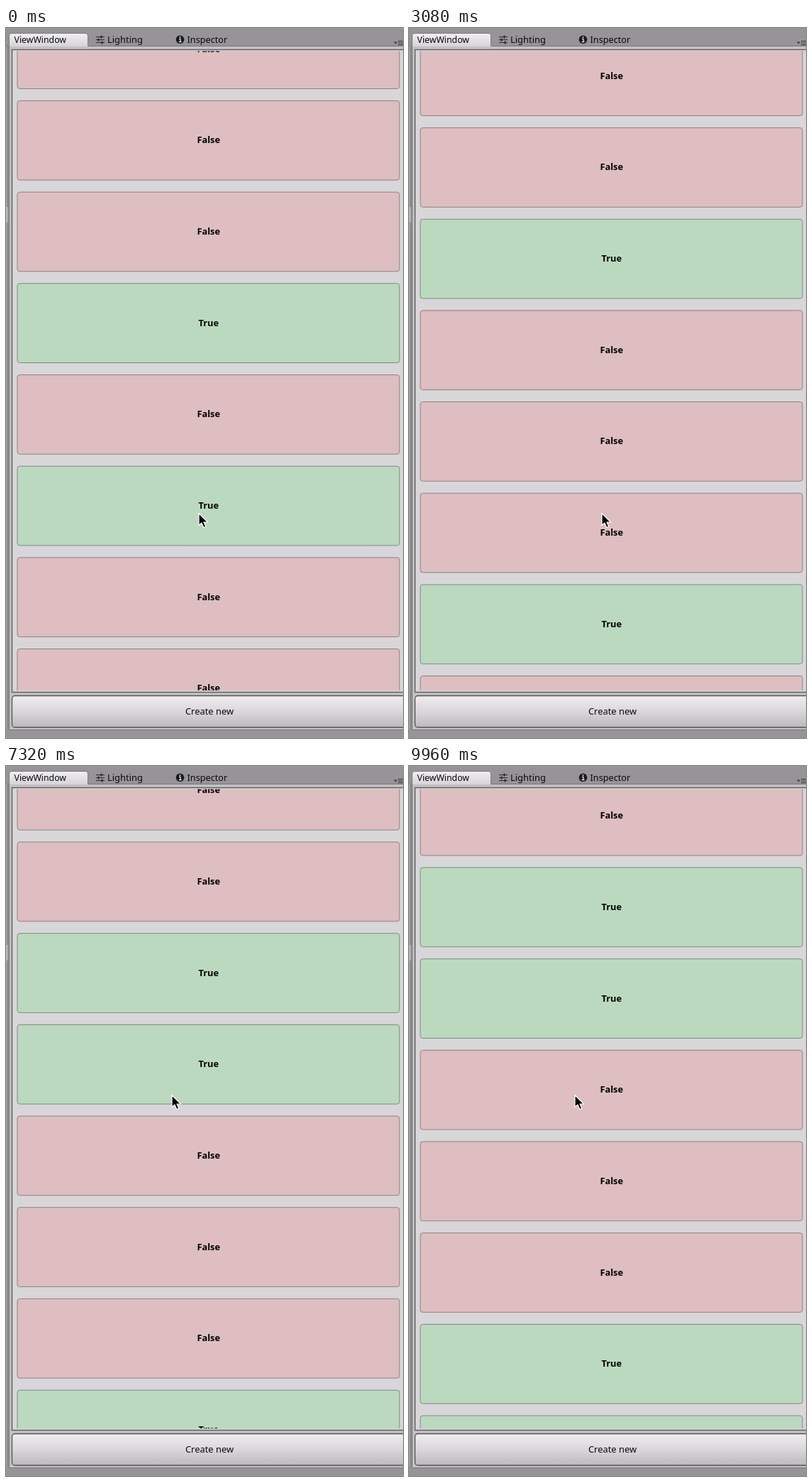
An HTML page that plays this animation: 560x1000 px, repeating every 10 s.

```html
<!DOCTYPE html>
<html lang="en">
<head>
<meta charset="utf-8">
<title>Endless list</title>
<style>
  html, body { margin: 0; width: 100%; height: 100%; overflow: hidden; background: #969496; }
  svg { display: block; width: 560px; height: 1000px; }
  text { font: 12.9px "Noto Sans", "Open Sans", sans-serif; fill: #0a0a0a; }
  .card text { font-size: 12.8px; font-weight: 700; text-anchor: middle; fill: #000; }
  .card rect { fill: #debec0; stroke: #8d8183; }
  .card.on rect { fill: #bbd9bf; stroke: #7d8b81; }
</style>
</head>
<body>
<svg viewBox="0 0 560 1000">
  <defs>
    <linearGradient id="tab" x2="0" y2="1">
      <stop offset="0" stop-color="#f1eff2"/><stop offset="1" stop-color="#d6d4d7"/>
    </linearGradient>
    <linearGradient id="up" x2="0" y2="1">
      <stop offset="0" stop-color="#f0edf1"/><stop offset=".5" stop-color="#dad7db"/><stop offset="1" stop-color="#bbb9bc"/>
    </linearGradient>
    <linearGradient id="down" x2="0" y2="1">
      <stop offset="0" stop-color="#8d8b8e"/><stop offset=".2" stop-color="#a3a1a4"/><stop offset="1" stop-color="#a3a1a4"/>
    </linearGradient>
    <clipPath id="view"><rect x="9" y="32.5" width="551" height="900.5"/></clipPath>
  </defs>

  <rect width="560" height="1000" fill="#969496"/>
  <rect y="25" width="3" height="963" fill="#a19fa2"/>
  <rect y="252" width="2" height="22" fill="#bab8bb"/>
  <path d="M0 25H2.500V252M2.500 274V988" fill="none" stroke="#7b797c"/>
  <rect x="4" y="25" width="556" height="963.500" fill="#c3c1c4"/>
  <path d="M560 25.500H4.500V988.500H560" fill="none" stroke="#777578"/>
  <path d="M4.500 26V11Q4.500 7.500 8 7.500H112Q115.500 7.500 115.500 11V26Z" fill="url(#tab)"/>
  <path d="M4.500 26V11Q4.500 7.500 8 7.500H112Q115.500 7.500 115.500 11V25.500" fill="none" stroke="#7d7b7e"/>
  <text x="11.500" y="21" style="font-size:12.3px">ViewWindow</text>

  <g stroke="#2c2a2d" stroke-width="1.200">
    <path d="M127 12.500H139M127 16.500H139M127 20.500H139"/>
    <path d="M134.500 10.500V14.500M130.500 14.500V18.500M135.500 18.500V22.500" stroke-width="2"/>
  </g>
  <text x="143" y="21">Lighting</text>
  <circle cx="245.500" cy="16.300" r="5.800" fill="#19181a"/>
  <path d="M244 15.300H246V19.500M243.800 19.500H247.500" fill="none" stroke="#e4e2e5" stroke-width="1.300"/>
  <circle cx="245.500" cy="13" r="1" fill="#e4e2e5"/>
  <text x="255.500" y="21" style="font-size:12.7px">Inspector</text>
  <path d="M547 19.500H552L549.500 22.500Z" fill="#39373a"/>
  <path d="M553 18.500H560M553 21H560M553 23.500H560" stroke="#39373a"/>

  <rect x="8.500" y="30.500" width="560" height="905" fill="#d8d6d9" stroke="#5f5d60" stroke-width="1.400"/>
  <g id="list" clip-path="url(#view)"></g>

  <rect id="button" x="8.500" y="940.500" width="570" height="44.500" rx="4" stroke="#555356" stroke-width="1.300"/>
  <text x="287" y="966.800" text-anchor="middle">Create new</text>

  <g id="cursor">
    <circle id="ring" r="24.500" fill="none" stroke="#111" stroke-width="1.500"/>
    <path d="M0 -.5V16.500L3.900 13L6.800 19.500L9.800 18.200L7 12H12.500Z" fill="#000" stroke="#fff" stroke-width="1.200" stroke-linejoin="round"/>
  </g>
</svg>
<script>
const NS = "http://www.w3.org/2000/svg";
const LOOP = 10000, STEP = 40, PITCH = 128.67;
const BASE = "FFTTTTT" + "FFTFFFTFTFF";
const $ = id => document.getElementById(id);

// Each move: start, end, from, to
const scrolls = [
  [0, 1040, -1313.4, -1262],
  [1040, 2040, -1262, -1205.5],
  [2080, 2800, -1205.5, -889.3],
  [3080, 4200, -889.3, 90.7],
  [6960, 7960, 348, 801.2],
  [7960, 9000, 801.2, 511.3],
  [9040, 9960, 511.3, 528.5]
];
const moves = [
  [4360, 5080, [272, 684], [260, 963]],
  [6280, 6720, [260, 963], [234, 464]]
];
// Each click: press, release, time the new item shows, its value
const clicks = [
  [5120, 5280, 5320, "T"],
  [5640, 5800, 5840, "T"],
  [6120, 6240, 6280, "F"]
];

const flick = u => 1 - (1 - u ** 1.3) ** 3;
const smooth = u => u * u * (3 - 2 * u);
const mix = (a, b, k) => a + (b - a) * k;

function make(tag, attrs, parent) {
  const el = document.createElementNS(NS, tag);
  for (const k in attrs) el.setAttribute(k, attrs[k]);
  return parent.appendChild(el);
}

const cards = Array.from({ length: 9 }, () => {
  const g = make("g", {}, $("list"));
  make("rect", { x: 16, y: 0.5, width: 539, height: 111.7, rx: 3.5 }, g);
  const label = make("text", { x: 285.7, y: 60.4 }, g);
  return { g, label };
});

function current(table, t) {
  const begun = table.filter(m => t >= m[0]);
  const [start, end, from, to] = begun.length ? begun[begun.length - 1] : table[0];
  return { u: Math.max(0, Math.min(1, (t - start) / (end - start))), from, to };
}

function scrollAt(t) {
  const { u, from, to } = current(scrolls, t);
  let y = mix(from, to, flick(u));
  // The later additions push the visible rows down until the next scroll
  if (t < 6960) for (const c of clicks.slice(1)) if (t >= c[2]) y += PITCH;
  return y;
}

function draw(t) {
  const items = BASE + clicks.filter(c => t >= c[2]).map(c => c[3]).join("");
  const y = scrollAt(t);
  const first = Math.ceil((-81 - y) / PITCH);
  cards.forEach(({ g, label }, k) => {
    const i = first + k, n = items.length;
    const on = items[((i % n) + n) % n] === "T";
    g.setAttribute("class", on ? "card on" : "card");
    g.setAttribute("transform", `translate(0 ${(y + i * PITCH).toFixed(2)})`);
    label.textContent = on ? "True" : "False";
  });

  const pressed = clicks.some(c => t >= c[0] && t < c[1]);
  $("button").setAttribute("fill", pressed ? "url(#down)" : "url(#up)");
  $("ring").setAttribute("visibility", pressed ? "visible" : "hidden");
  const { u, from, to } = current(moves, t);
  const k = smooth(u);
  $("cursor").setAttribute("transform", `translate(${mix(from[0], to[0], k)} ${mix(from[1], to[1], k)})`);
}

const start = performance.now();
function tick() {
  const t = (performance.now() - start) % LOOP;
  draw(Math.floor(t / STEP) * STEP);
  requestAnimationFrame(tick);
}
tick();
</script>
</body>
</html>
```
